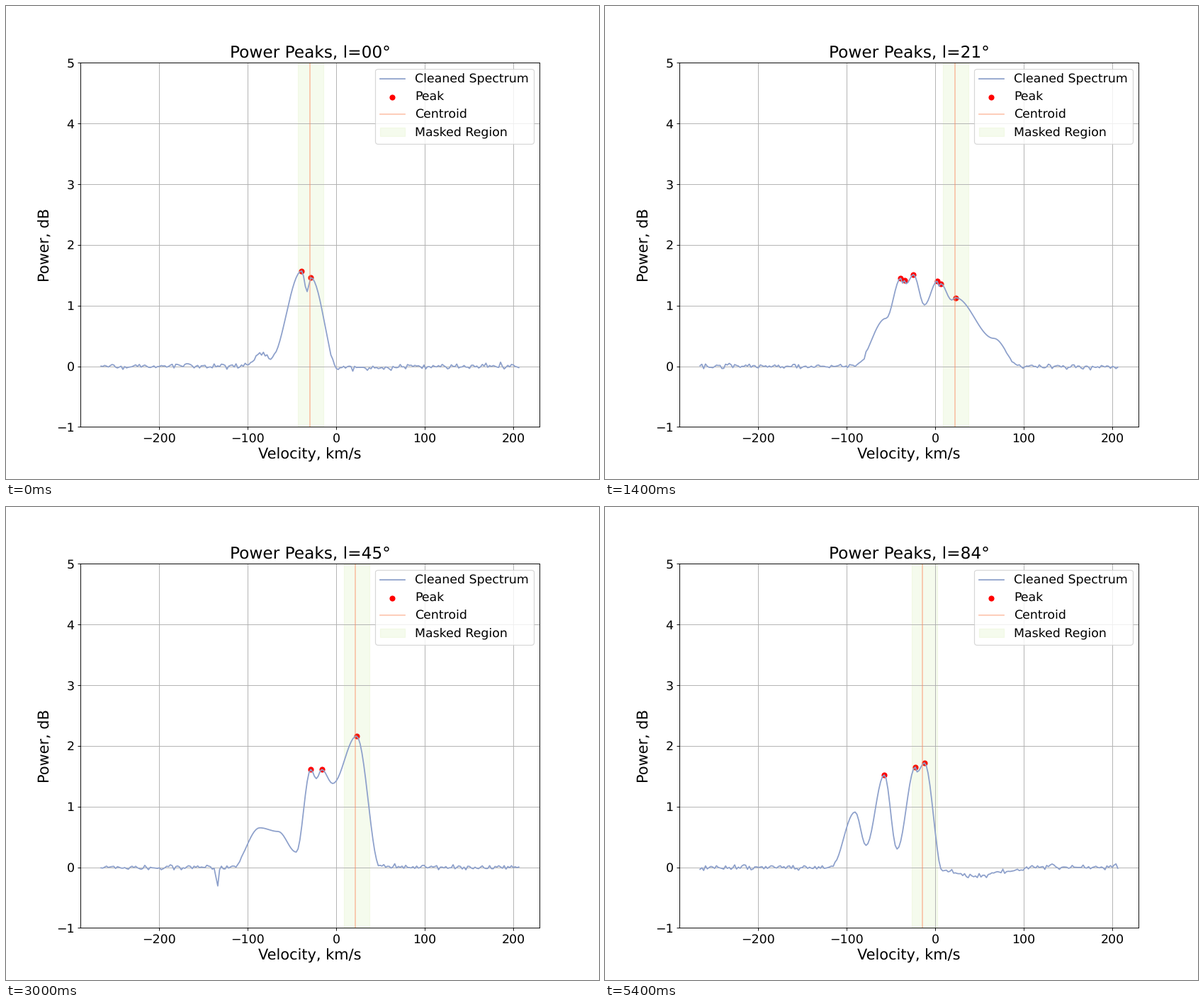
These frames come from a looping animation (837 by 669 pixels, 5.6 s). A matplotlib script:

```python
import numpy as np
import matplotlib.pyplot as plt
from matplotlib.animation import FuncAnimation

DPI = 83.7
STEP = 2.061
V = -265.8 + STEP * np.arange(230)
ANGLES = [a for a in range(0, 87, 3) if a != 75]
HALF_MASK = 7 * STEP
PEAK_MIN = 1.07
LEGEND_EDGE = 43.5


def twin(v, p):
    """Two narrow peaks around v with a notch between them."""
    return (v - STEP, p), (v, p - .08), (v + STEP, p - .04)


# Turning points (velocity, power) of the spectrum at a few longitudes
TURNS = {
    0: [(-105, 0), (-84, .2), (-75, .13), (-38.7, 1.57), (-33, 1.23),
        (-28.2, 1.46), (2, -.03)],
    15: [(-86, 0), (-57, .76), *twin(-34.6, 1.44), (-29, 1.33), *twin(-18.6, 1.55),
         (-8, 1.44), (-5.8, 1.48), (36, .2), (95, .17)],
    21: [(-90, 0), (-55, .79), *twin(-36.8, 1.45), (-33, 1.36), (-24.6, 1.51),
         (-11.5, 1.01), *twin(4.4, 1.4), (19, 1.09), (23, 1.13), (66, .46), (94, 0)],
    33: [(-102, 0), (-78, .49), (-46, .52), (-36.6, 1.18), (-34.5, 1.14),
         (-26.6, 1.52), (-21, 1.37), (-18.6, 1.4), (-6, 1.14), *twin(12.4, 1.46),
         (27, .84), *twin(43.9, 1.14), (48, 1.08), (51.9, 1.21), (77, .04)],
    45: [(-134, -.32), (-132, 0), (-118, 0), (-87, .65), (-66, .59), (-46, .25),
         (-28.2, 1.61), (-23, 1.46), (-16.2, 1.61), (-3.5, 1.38), (23, 2.16), (50, 0)],
    66: [(-118, -.03), (-92, .87), (-62, 0), (-40, .78), (-18.2, 2.04), (10, -.05),
         (36, -.16)],
    84: [(-118, 0), (-90, .91), (-77.8, .36), (-57.8, 1.52), (-43.5, .3),
         (-22.6, 1.65), (-20, 1.57), (-11.8, 1.72), (8, -.05), (38, -.14)],
}
KEYS = list(TURNS)


def curve(turns):
    """Ease from turn to turn; also return the foot, tip and tail velocities."""
    v, p = np.array([(-137, 0), *turns, (120, 0)]).T
    v = V[np.rint((v - V[0]) / STEP).astype(int)]
    index = np.arange(len(v))
    whole, part = np.divmod(np.interp(V, v, index), 1)
    power = np.interp(whole + (1 - np.cos(np.pi * part)) / 2, index, p)
    tip = np.flatnonzero(p > PEAK_MIN)[-1]
    return np.array([V[0], v[1], v[tip], v[tip + 1], V[-1]]), power


def spectrum(angle):
    """Blend the two nearest curves with their anchors aligned; add noise."""
    i = min(np.searchsorted(KEYS, angle, side="right"), len(KEYS) - 1)
    lo, hi = KEYS[i - 1], KEYS[i]
    t = (angle - lo) / (hi - lo)
    (a, p), (b, q) = curve(TURNS[lo]), curve(TURNS[hi])
    mid = (1 - t) * a + t * b
    p = np.interp(np.interp(V, mid, a), V, p)
    q = np.interp(np.interp(V, mid, b), V, q)
    power = (1 - t) * p + t * q
    noise = np.random.default_rng(angle).normal(0, .022, len(V))
    return power + np.where(power < .25, noise, 0)


def find_peaks(p):
    inner = p[1:-1]
    return 1 + np.flatnonzero((inner > p[:-2]) & (inner >= p[2:]) & (inner > PEAK_MIN))


plt.rcParams.update({"font.family": "DejaVu Sans", "font.size": 15,
                     "axes.labelsize": 18, "axes.titlesize": 20,
                     "text.hinting": "no_hinting"})
fig, ax = plt.subplots(figsize=(837.01 / DPI, 669.01 / DPI), dpi=DPI)
line, = ax.plot([], [], color="#8da0cb", label="Cleaned Spectrum")
dots = ax.scatter([], [], color="red", label="Peak")
center = ax.axvline(0, color="#fc8d62", alpha=.5, label="Centroid")
mask = ax.add_patch(plt.Rectangle((0, 0), 2 * HALF_MASK, 1, color="#a6d854", alpha=.1,
                                  transform=ax.get_xaxis_transform(),
                                  label="Masked Region"))
ax.set(xlim=(-289.4, 229.8), ylim=(-1, 5),
       xlabel="Velocity, km/s", ylabel="Power, dB")
ax.grid()
title = ax.set_title("")
legend = ax.legend(loc="upper right")


def draw(i):
    p = spectrum(ANGLES[i])
    peaks = find_peaks(p)
    tip = V[peaks[-1]]
    near = np.abs(V - tip) < HALF_MASK + STEP / 2
    centroid = np.average(V[near], weights=p[near])

    line.set_data(V, p)
    dots.set_offsets(np.column_stack([V[peaks], p[peaks]]))
    center.set_xdata([centroid, centroid])
    mask.set_x(tip - HALF_MASK)
    title.set_text(f"Power Peaks, l={ANGLES[i]:02d}°")
    legend.set_loc("upper left" if tip + HALF_MASK > LEGEND_EDGE else "upper right")
    return line, dots, center, mask, title, legend


anim = FuncAnimation(fig, draw, frames=len(ANGLES), interval=200, repeat=True)
plt.show()
```
